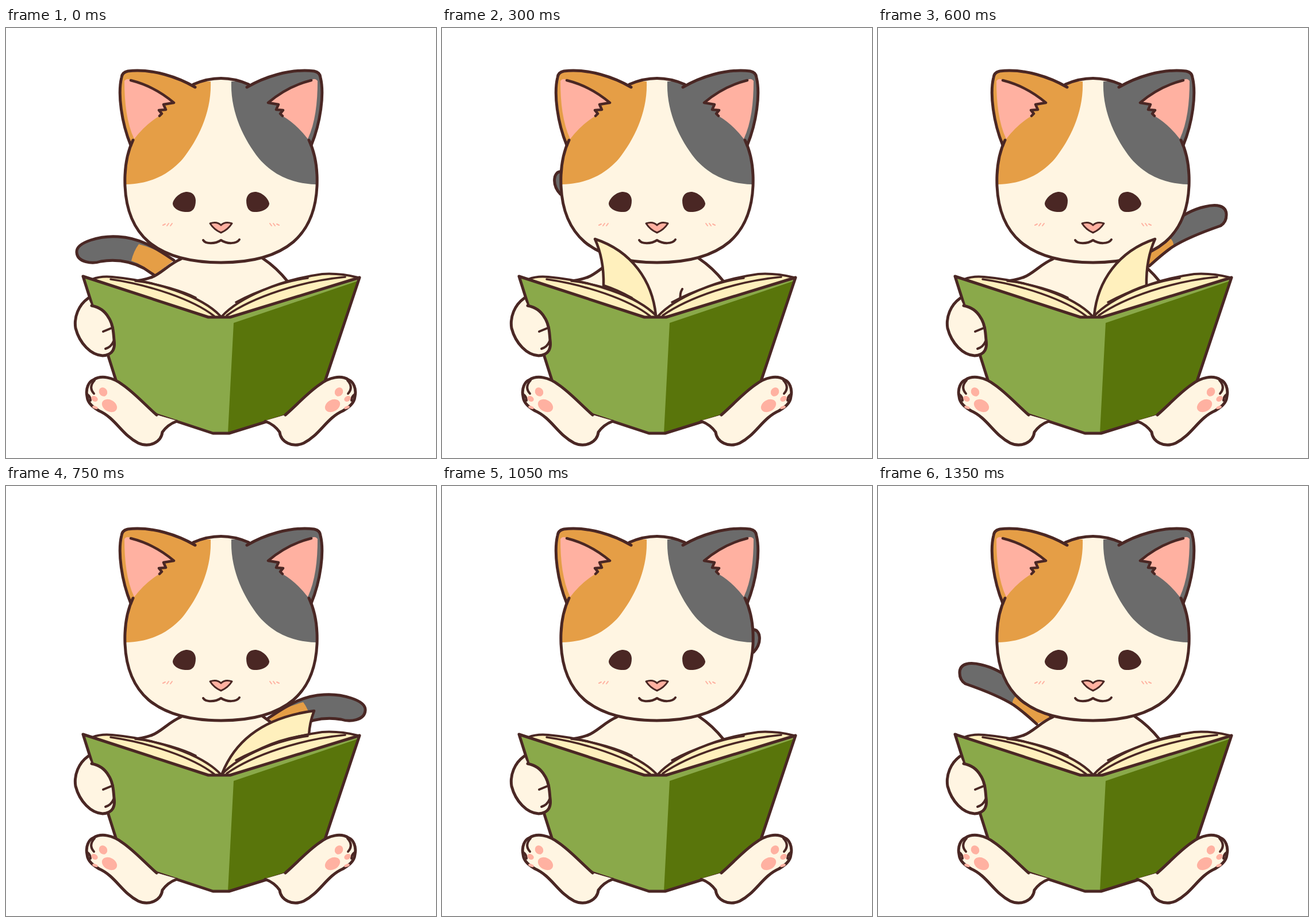
Recreate the animation shown at these times as an HTML page. Size 748 by 748 pixels, loop 2.25 s.

```html
<!DOCTYPE html>
<html lang="en">
<head>
<meta charset="utf-8">
<title>Reading cat</title>
<style>
  html, body { margin: 0; width: 100%; height: 100%; overflow: hidden; background: #fff; }
  svg { display: block; width: 100%; height: 100%; }
</style>
</head>
<body>
<svg id="stage" viewBox="0 0 748 748" fill="none" stroke-linecap="round" stroke-linejoin="round"></svg>
<script>
const LINE = '#4a2724', CREAM = '#fff5e2', ORANGE = '#e59e46', GRAY = '#6b6b6b',
      PINK = '#ffb1a1', PAPER = '#fff0bd', GREEN = '#8aa94a', DARK = '#59750b';

const fill = (d, color) => `<path d="${d}" fill="${color}"/>`;
const line = (d, width = 5) => `<path d="${d}" stroke="${LINE}" stroke-width="${width}"/>`;
const shape = (d, color, width = 5) => fill(d, color) + line(d, width);
const flip = s => `<g transform="matrix(-1 0 0 1 748 0)">${s}</g>`;
const both = s => s + flip(s);
const group = (id, s) => `<g id="${id}">${s}</g>`;
const pad = (x, y, rx, ry, turn) =>
  `<ellipse cx="${x}" cy="${y}" rx="${rx}" ry="${ry}" transform="rotate(${turn} ${x} ${y})" fill="${PINK}"/>`;

// Tails, drawn on the left side
const lowTail = 'M292 404C262 384 235 365 195 363C165 361 122 372 123 390C124 408 150 411 165 406C190 402 215 405 240 418L258 430';
const highTail = 'M300 400C270 370 230 322 180 311C160 306 142 308 142 325Q142 338 152 344C175 352 214 367 236 381C252 392 264 403 276 414';
const tails = {
  low: fill(lowTail, GRAY) + fill('M231 376Q222 388 218 405Q240 412 258 430L292 404Q262 384 231 376Z', ORANGE) + line(lowTail),
  high: fill(highTail, GRAY) + fill('M242 364Q233 370 234 380Q256 393 276 414L302 402Z', ORANGE) + line(highTail),
  peek: shape('M208 250C194 248 190 272 206 289', GRAY)
};

// Turning pages: "start" lies on the left, the others are drawn on the right
const pages = {
  start: shape('M374 500C352 452 300 410 220 394Q224 420 232 443C290 450 340 470 370 500', PAPER, 4.5),
  low: shape('M376 500C400 440 452 402 536 391Q528 412 527 433C470 440 415 465 380 500', PAPER, 4.5),
  high: shape('M376 500C382 440 418 388 482 367Q466 402 467 448C430 460 400 480 380 500', PAPER, 4.5),
  upright: shape('M355 488Q358 475 369 481M376 483Q383 483 384 493', CREAM, 4) +
    shape('M373 500C367 450 368 400 376 359Q376 430 374 500', PAPER, 4)
};
const arms = {
  reach: line('M420 453Q409 468 399 479', 4),
  lift: line('M418 454Q413 462 415 473', 4)
};

const ear = 'M329 103C300 86 255 70 212 75Q202 77 201 86C194 115 201 165 217 204';
const patch = ear + 'C208 225 206 250 209 272C250 271 283 256 308 227C335 193 358 145 356 93Q340 92 326 98Z';
const tuft = 'C245 98 272 113 292 130L274 133L278 142L266 143L271 149L267 153';
const innerEar = fill('M206 92Q211 86 217 91' + tuft + 'Q243 167 223 193C210 165 206 130 206 92Z', PINK) +
  line('M217 91' + tuft, 4.5);
const skull = 'M221 195C208 222 206 250 207 275C209 320 225 352 248 372C280 399 325 408 374 408C423 408 468 399 500 372C523 352 539 320 541 275C542 250 540 222 527 195';

const face = both(
    fill('M290 305C292 295 304 285 315 285Q329 286 330 300C330 313 325 320 316 320C305 321 290 315 290 305Z', LINE) +
    `<path d="M273 343L277 341M280 344L283 340M286 344L289 340" stroke="${PINK}" stroke-width="2"/>`) +
  shape('M355 340Q367 336 374 343Q381 336 393 340Q386 351 374 356Q362 351 355 340Z', PINK, 3) +
  line('M343 369C347 376 364 376 374 369C384 376 401 376 406 368', 4);

const head = fill(skull + 'L422 98Q374 76 326 98Z', CREAM) +
  fill(patch, ORANGE) + flip(fill(patch, GRAY)) +
  both(innerEar + line(ear)) +
  line(skull) + line('M326 98Q374 77 422 98') + face;

const body = fill('M304 402C284 410 268 429 252 434Q235 440 215 441L374 505L490 441C478 426 465 413 447 401Z', CREAM) +
  line('M304 402C284 410 268 429 252 434Q235 440 215 441M447 401C465 413 478 426 490 441');

const paper =
  fill('M148 436Q165 431 185 433C260 440 340 466 374 501L352 503Z', PAPER) +
  fill('M374 501C405 470 475 440 550 428Q580 427 612 434L390 503Z', PAPER) +
  line('M150 437Q165 431 185 433C260 440 340 466 373 501M612 434Q580 426 550 428C475 438 405 470 376 501', 4) +
  line('M182 437C250 447 325 472 362 501M225 440C265 444 310 459 330 469M590 433C510 441 430 468 384 500M400 477C440 455 490 440 525 435', 3.5);

const cover = 'M134 432L352 503H390L615 434L553 620L543 657L388 705H360L205 654L191 612Z';
const book = paper + fill(cover, GREEN) +
  fill('M396 513L612 440L553 620L543 657L386 705Z', DARK) + line(cover);

const hand = shape('M143 470C126 482 118 503 121 522C128 549 148 569 168 570C187 569 190 556 188 543C187 530 186 514 178 503C171 491 160 485 149 483', CREAM) +
  line('M186 521L169 528M187 545Q183 555 173 558', 4);

// The heel runs into the thigh, so the outline stays open there
const foot = fill('M262 673L297 683Q279 692 270 704L250 700Z', CREAM) +
  shape('M262 673C240 654 224 635 202 620C186 608 166 603 152 612C144 615 138 627 141 641C142 653 152 660 162 666C190 678 202 708 230 722C250 731 270 720 272 703Q281 690 297 684', CREAM) +
  line('M154 613Q143 625 153 636M141 637Q147 641 147 648', 4) +
  pad(169, 633, 7, 8, -30) + pad(154, 645, 6, 4.5, 30) + pad(180, 657, 14, 10, 30) + pad(155, 660, 5, 2.5, 20);

const stage = document.getElementById('stage');
stage.innerHTML = group('tail', '') + body + group('arm', '') + head +
  group('page', '') + book + hand + both(foot);

// Each pose: tail, tail side, page, page side, arm
const L = s => s, R = flip;
const poses = [
  ['low', L],
  ['high', L, 'start', L, 'reach'],
  ['peek', L, 'high', R, 'lift'],
  ['peek', R, 'upright', L, 'lift'],
  ['high', R, 'high', L],
  ['low', R, 'low', L],
  ['high', R],
  ['peek', R],
  ['peek', L],
  ['high', L]
];
const STEP = 150, LOOP = 2250;
const part = id => document.getElementById(id);
const tail = part('tail'), page = part('page'), arm = part('arm');
let shown = -1;

function draw(time) {
  const index = Math.min(Math.floor(time % LOOP / STEP), poses.length - 1);
  if (index === shown) return;
  shown = index;
  const [tailName, tailSide, pageName, pageSide, armName] = poses[index];
  tail.innerHTML = tailSide(tails[tailName]);
  page.innerHTML = pageName ? pageSide(pages[pageName]) : '';
  arm.innerHTML = arms[armName] || '';
}

const start = performance.now();
function tick() {
  draw(performance.now() - start);
  requestAnimationFrame(tick);
}
tick();
</script>
</body>
</html>
```
